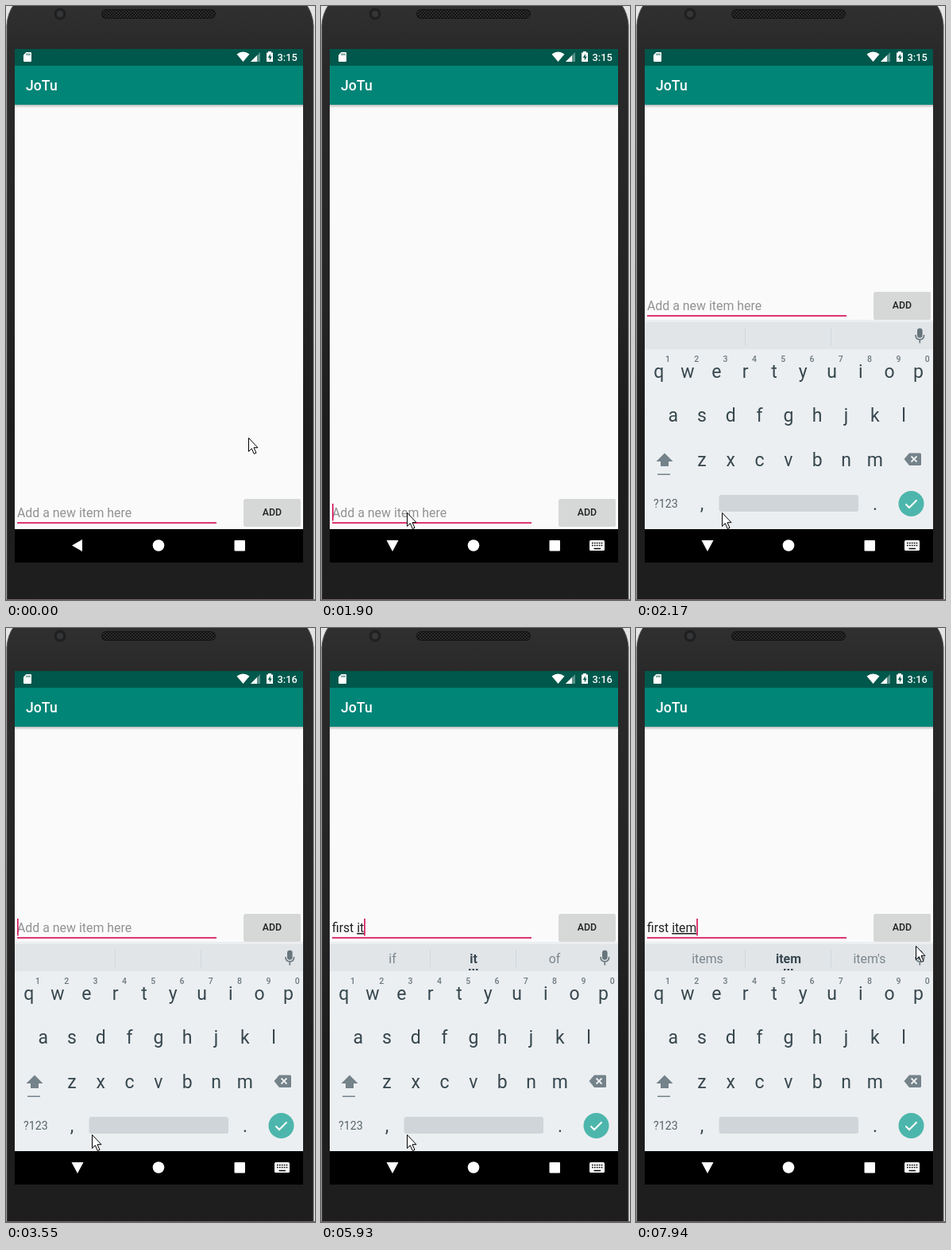
Write an HTML page that moves like this. It is 389 px wide and 746 px high and loops after 8 s.

```html
<!DOCTYPE html>
<html lang="en">
<head>
<meta charset="utf-8">
<title>List app</title>
<style>
html, body { margin: 0; width: 100%; height: 100%; overflow: hidden; background: #e4e4e4; }
svg { display: block; width: 389px; height: 746px; font-family: Roboto, "Noto Sans", sans-serif; }
text { white-space: pre; }
.medium { font-weight: 500; }
.mid { text-anchor: middle; }
</style>
</head>
<body>
<svg viewBox="0 0 389 746">
  <defs>
    <linearGradient id="body" x2="0" y2="1">
      <stop stop-color="#303030"/><stop offset=".08" stop-color="#292929"/>
      <stop offset=".5" stop-color="#242424"/><stop offset=".7" stop-color="#1d1d1d"/>
      <stop offset="1" stop-color="#1e1e1e"/>
    </linearGradient>
    <linearGradient id="shade" x2="0" y2="1">
      <stop stop-opacity=".25"/><stop offset="1" stop-opacity="0"/>
    </linearGradient>
    <pattern id="mesh" width="4" height="4" patternUnits="userSpaceOnUse">
      <path d="M0 0h2v2h-2zM2 2h2v2h-2z" fill="#2c2c2c"/>
    </pattern>
    <clipPath id="screen"><path d="M11 54H374V699H11z"/></clipPath>
  </defs>

  <!-- phone -->
  <path d="M1 750V24Q2 9 10-2H378Q386 9 387 24V750z" fill="url(#body)" stroke="#555"/>
  <path d="M0 745.5H389" stroke="#75676b"/>
  <circle cx="68" cy="10" r="7.5" fill="#202020"/>
  <circle cx="68" cy="10" r="4" fill="#343638"/>
  <rect x="120" y="4" width="144" height="12" rx="6" fill="#131313"/>
  <rect x="121" y="5" width="142" height="10" rx="5" fill="url(#mesh)"/>

  <g clip-path="url(#screen)">
    <path d="M11 54H374V699H11z" fill="#fafafa"/>
    <path d="M11 124H374v4H11z" fill="url(#shade)"/>
    <path d="M11 75H374v49H11z" fill="#008577"/>
    <path d="M11 54H374v21H11z" fill="#00574b"/>
    <text class="medium" x="25" y="106" font-size="17.6" fill="#fff">JoTu</text>

    <!-- status icons -->
    <g fill="#fff">
      <path d="M25.500 58H31q1 0 1 1v10q0 1-1 1h-8q-1 0-1-1v-7.500z"/>
      <path d="M26 59.500v2.500M28 59.500v2.500M30 59.500v2.500" stroke="#00574b" stroke-width=".9"/>
      <path d="M298.500 70L290.500 60.500Q298.500 54.500 306.500 60.500z"/>
      <path d="M308 70L320 58V70z" opacity=".35"/>
      <path d="M308 70L316 62V70z"/>
      <path d="M328 58.500h2v-1.500h4v1.500h2V70h-8z"/>
      <path d="M332.800 60l-3 5h2v3.500l3-5h-2z" fill="#00574b"/>
      <text id="clock" class="medium" x="341.500" y="69" font-size="12.800"></text>
    </g>

    <!-- input row -->
    <g id="row">
      <text id="hint" x="14" y="642" font-size="15.900" fill="#929292">Add a new item here</text>
      <text id="entry" x="14" y="642" font-size="15.700" fill="#212121"><tspan id="done"></tspan><tspan id="word"></tspan></text>
      <path d="M14 649.200H265" stroke="#d81b60" stroke-width="1.700"/>
      <rect id="caret" y="625" width="1.700" height="21.500" fill="#d81b60"/>
      <rect x="299" y="620" width="72" height="34" rx="2" opacity=".14"/>
      <rect x="299.500" y="619" width="71.500" height="33" rx="2" fill="#d6d7d7"/>
      <text class="medium mid" x="335" y="640" font-size="12.300" fill="#212121">ADD</text>
    </g>

    <path d="M11 657H374V699H11z"/>

    <!-- keyboard -->
    <g id="board" fill="#37474f">
      <path d="M11 394H374V657H11z" fill="#eceff1"/>
      <path d="M11 397H374V431H11z" fill="#e1e5e8"/>
      <path d="M137.500 404v22M245.500 404v22" stroke="#cfd6d9"/>
      <g id="tips" class="mid" font-size="15.900">
        <text x="90" y="420.500" fill="#7b878d"></text>
        <text x="192" y="420.500"></text>
        <text x="294" y="420.500" fill="#7b878d"></text>
        <path d="M186 428h2.500v2h-2.500zM190.500 428h2.500v2h-2.500zM195 428h2.500v2h-2.500z"/>
      </g>
      <g fill="none" stroke="#67757c" stroke-width="1.600">
        <rect x="354.800" y="405.500" width="5" height="10.500" rx="2.500" fill="#67757c"/>
        <path d="M352 413q0 6 5.300 6t5.300-6M357.300 419v4.500"/>
      </g>
      <g id="keys" class="mid" font-size="23"></g>
      <g fill="#74828a">
        <path d="M36 561.500L46.500 572H41V578H31V572H25.500z"/>
        <path d="M27 587.500H43v1.500H27z"/>
        <path d="M344 561.500H357.500q1.500 0 1.500 1.500v12.500q0 1.500-1.500 1.500H344L337.500 569z"/>
        <path d="M346.500 565.500l7 7m0-7l-7 7" stroke="#eceff1" stroke-width="1.800"/>
      </g>
      <text x="22" y="630" font-size="14.200" fill="#56646b">?123</text>
      <text class="mid" x="83" y="633" font-size="23">,</text>
      <text class="mid" x="301" y="633" font-size="23">.</text>
      <rect x="104.500" y="614" width="175.500" height="21" rx="3" fill="#cfd5d8"/>
      <circle cx="346.500" cy="625" r="16" fill="#4db6ac"/>
      <path d="M339.500 625.500l4.500 4.500 9.500-9.500" fill="none" stroke="#fff" stroke-width="2"/>
    </g>

    <!-- navigation -->
    <g fill="#fff">
      <path id="back"/>
      <circle cx="192" cy="677.500" r="7.300"/>
      <rect x="287.500" y="671" width="13.500" height="13.500" rx="1"/>
      <g id="switcher">
        <rect x="338" y="671" width="19" height="13" rx="1.500"/>
        <path d="M341 674.500h13.500M341 677.500h13.500" stroke="#000" stroke-width="1.700" stroke-dasharray="1.700 1.200"/>
        <path d="M343.500 681.500h8.500" stroke="#000" stroke-width="1.500"/>
      </g>
    </g>
  </g>

  <path id="pointer" d="M.5.500V17.500L4.300 13.800 7.300 20.500 10 19.300 7 12.700H12z" fill="#fff" stroke="#000"/>
</svg>

<script>
const $ = id => document.getElementById(id);
const LOOP = 8000;

const label = (x, y, s, extra = '') => `<text x="${x}" y="${y}" ${extra}>${s}</text>`;
const pitch = 36.3;
let keys = '';
[['qwertyuiop', 28.7, 467], ['asdfghjkl', 46.7, 522], ['zxcvbnm', 83, 577.5]].forEach(([letters, x, y], r) => {
  [...letters].forEach((c, i) => {
    keys += label(x + i * pitch, y, c);
    if (!r) keys += label(40 + i * pitch, 447, (i + 1) % 10, 'font-size="10.500" class="medium" fill="#6b787f"');
  });
});
$('keys').innerHTML = keys;

// Each track lists [start time, ...values], held until the next entry.
const pointer = [[0, 305, 542], [150, 242, 607], [300, 215, 622], [430, 209, 627], [570, 207, 628],
  [1120, 150, 632], [1240, 108, 636], [7550, 144, 635], [7670, 210, 600], [7790, 287, 518], [7940, 352, 399]];
const caret = [[0, 0], [810, 1], [2170, 0], [2570, 1], [3000, 0], [3550, 1], [3980, 0], [4420, 1], [7430, 0], [7940, 1]];
// committed text, word being typed, underlined
const entry = [[0, '', '', 0], [4420, '', 'f', 0], [4560, '', 'fi', 0], [4680, '', 'fir', 0], [4800, '', 'firs', 0],
  [4920, '', 'first', 1], [5080, 'first ', '', 0], [5330, 'first ', 'i', 0], [5470, 'first ', 'i', 1],
  [5930, 'first ', 'it', 1], [6060, 'first ', 'itm', 0], [6200, 'first ', 'itm', 1], [6480, 'first ', 'it', 1],
  [6600, 'first ', 'ite', 1], [6750, 'first ', 'item', 1]];
// three suggestions, middle one bold
const tips = [[0, '', '', '', 0], [4560, 'for', 'f', 'of', 0], [4680, 'for', 'fi', 'fir', 0], [4800, 'for', 'fir', 'first', 0],
  [4920, 'for', 'firs', 'first', 0], [5080, 'firsts', 'first', "first's", 1], [5330, '', '', '', 0],
  [5470, 'is', 'I', 'in', 1], [5930, 'if', 'it', 'of', 1], [6200, 'item', 'itm', 'Itm', 0],
  [6750, 'item', 'ite', 'its', 0], [6900, 'items', 'item', "item's", 1]];

const at = (track, t) => track.findLast(e => e[0] <= t).slice(1);
const show = (el, on) => el.style.display = on ? '' : 'none';
const move = (el, x, y) => el.setAttribute('transform', `translate(${x} ${y})`);

function draw(t) {
  const opening = t >= 2050 && t < 2170;
  move($('pointer'), ...at(pointer, t));
  move($('row'), 0, t < 2170 ? 0 : -260);
  move($('board'), 0, opening ? 62 : 0);
  $('board').setAttribute('opacity', opening ? .48 : 1);
  show($('board'), t >= 2050);
  show($('switcher'), t >= 1900);
  $('back').setAttribute('d', t < 1900 ? 'M83 677.500L96 670V685z' : 'M82.500 671H97.500L90 685z');
  $('clock').textContent = t < 3400 ? '3:15' : '3:16';

  const [done, word, lined] = at(entry, t);
  $('done').textContent = done;
  $('word').textContent = word;
  $('word').style.textDecoration = lined ? 'underline' : 'none';
  show($('hint'), !(done + word));
  show($('caret'), at(caret, t)[0]);
  $('caret').setAttribute('x', 14 + (done + word ? $('entry').getComputedTextLength() : 0));

  const [left, middle, right, bold] = at(tips, t);
  const slots = $('tips').children;
  [left, middle, right].forEach((s, i) => slots[i].textContent = s);
  slots[1].style.fontWeight = bold ? 700 : 400;
  show(slots[3], middle);
}

function tick() {
  draw(performance.now() % LOOP);
  requestAnimationFrame(tick);
}
tick();
</script>
</body>
</html>
```
